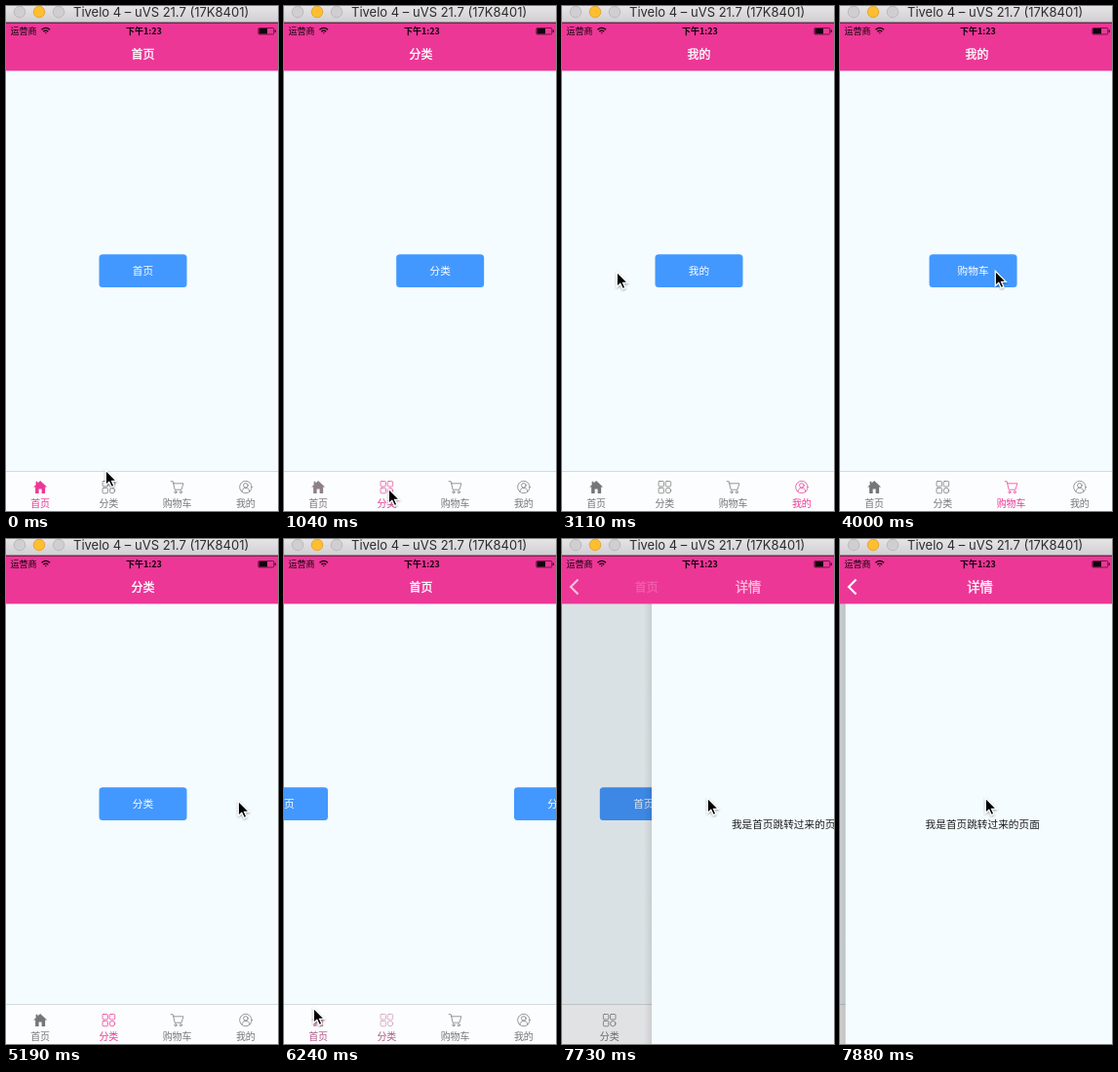
Recreate the animation shown at these times as an HTML page. Size 279 by 517 pixels, loop 8 s.

```html
<!DOCTYPE html>
<html lang="zh-CN">
<head>
<meta charset="utf-8">
<title>Tab demo</title>
<style>
  html, body { margin: 0; width: 100%; height: 100%; overflow: hidden; background: #f4fcff; }
  svg { display: block; width: 279px; height: 517px; }
  text { font-family: "Noto Sans CJK SC", "Noto Sans CJK", sans-serif; text-anchor: middle; }
  .window { font: 13px Inter, sans-serif; text-anchor: start; fill: #2c2c2c; }
  .status { font-size: 9px; fill: #14030c; }
  .nav { font-size: 12px; fill: #fff; stroke: #fff; stroke-width: .35; }
  #detailTitle { font-size: 13.3px; }
  .body { font-size: 10.67px; }
  .tab text { font-size: 10px; fill: currentColor; }
  .line { fill: none; stroke: currentColor; stroke-width: .75; stroke-linecap: round; stroke-linejoin: round; }
</style>
</head>
<body>
<svg viewBox="0 0 279 517">
  <defs>
    <linearGradient id="chrome" x2="0" y2="1">
      <stop stop-color="#e6e4e6"/><stop offset="1" stop-color="#d0ced0"/>
    </linearGradient>
    <linearGradient id="edge">
      <stop stop-color="#000" stop-opacity="0"/><stop offset="1" stop-color="#000" stop-opacity=".09"/>
    </linearGradient>
    <filter id="soft" x="-50%" y="-50%" width="200%" height="200%">
      <feDropShadow dx="0" dy="1" stdDeviation=".9" flood-opacity=".4"/>
    </filter>
  </defs>

  <rect width="279" height="517" fill="#f4fcff"/>
  <g id="under">
    <rect width="281" height="517" fill="#f4fcff"/>
    <g id="pages"></g>
    <rect y="476" width="281" height="41" fill="#fcfdfe"/>
    <rect y="476" width="281" height="1" fill="#d5dadc"/>
    <g id="tabs"></g>
  </g>
  <rect id="dim" y="66" width="279" height="451"/>
  <g id="detail">
    <rect x="-8" y="66" width="8" height="451" fill="url(#edge)"/>
    <rect y="66" width="281" height="451" fill="#f4fcff"/>
    <text class="body" x="140.500" y="296" fill="#1c1c1c">我是首页跳转过来的页面</text>
  </g>

  <rect y="17" width="279" height="49.400" fill="#ec3796"/>
  <text class="nav" id="title" y="53.800"></text>
  <text class="nav" id="detailTitle" y="54.200">详情</text>
  <path id="back" d="M16.500 41.500 9 49l7.500 7.500" fill="none" stroke="#fff" stroke-width="2.200"/>

  <text class="status" x="18" y="29">运营商</text>
  <g fill="none" stroke="#14030c" stroke-width="1.300">
    <path d="M36.500 24.300q4.300-3.800 8.600 0M38.300 26.200q2.500-2.200 5 0"/>
    <path d="M39.600 27.300h2.400l-1.200 1.300z" fill="#14030c" stroke="none"/>
  </g>
  <text class="status" x="141.500" y="29" font-weight="700">下午1:23</text>
  <rect x="258.800" y="22.500" width="16" height="6.500" rx="1" fill="none" stroke="#4d1030" stroke-width=".8"/>
  <rect x="259.500" y="23" width="8.500" height="5.500" fill="#14030c"/>
  <rect x="275.500" y="24.500" width="1.500" height="2.500" fill="#4d1030"/>

  <rect width="279" height="17" fill="url(#chrome)"/>
  <rect y="16.600" width="279" height="1" fill="#3a1228"/>
  <g stroke-width=".8">
    <circle cx="14" cy="6" r="5.800" fill="#d0ced0" stroke="#b5b3b5"/>
    <circle cx="34" cy="6" r="5.800" fill="#fdbe30" stroke="#dd9f2b"/>
    <circle cx="54" cy="6" r="5.800" fill="#d0ced0" stroke="#b5b3b5"/>
  </g>
  <text class="window" x="69" y="11">Tivelo 4 – uVS 21.7 (17K8401)</text>

  <g id="cursor" filter="url(#soft)">
    <path transform="translate(-.7 -.7)" d="M0 0V15.200L3.500 12 6 17.300 8.600 16.100 6.200 11H11Z" stroke="#fff" stroke-width="1.200"/>
  </g>
</svg>
<script>
const LOOP = 8000, TICK = 148.4, LEAD = 14;
const W = 281; // page width, slightly wider than the visible stage
const $ = id => document.getElementById(id);
const names = ['首页', '分类', '购物车', '我的'];
const icons = [
  `<path fill="currentColor" d="M0-6.500 7 0H5V6.500H1.500V2H-1.500V6.500H-5V0H-7L-4.500-2.300V-5.800H-2.700V-4Z"/>`,
  `<g class="line"><rect x="-6.300" y="-6" width="5.400" height="5.400" rx="1"/>
   <rect x=".9" y="-6" width="5.400" height="5.400" rx="1"/>
   <rect x="-6.300" y=".9" width="5.400" height="5.400" rx="1"/><circle cx="3.600" cy="3.600" r="2.700"/></g>`,
  `<g class="line"><path d="M-6.500-5.800H-4.400L-2.500 2.700H4.300L6.300-3.700H-3.800"/>
   <circle cx="-1.700" cy="5.200" r="1.100"/><circle cx="3.700" cy="5.200" r="1.100"/></g>`,
  `<g class="line"><circle r="6.200"/><circle cy="-1.700" r="2.300"/><path d="M-4 4.600Q-3.500 .9 0 .9T4 4.600"/></g>`
];

$('pages').innerHTML = names.map((name, i) => `<g transform="translate(${i * W})">
  <g class="button"><rect x="95.500" y="254.300" width="90" height="33.750" rx="3.500" fill="#4398ff"/>
  <text class="body" x="140.500" y="275.400" fill="#fff">${name}</text></g></g>`).join('');
$('tabs').innerHTML = names.map((name, i) => `<g class="tab" transform="translate(${(i + .5) * W / 4} 492.500)">
  <g class="icon">${icons[i]}</g><text y="20.900">${name}</text></g>`).join('');
const tabs = [...document.querySelectorAll('.tab')];
const homeButton = document.querySelector('.button');

// Progress per tick of a page change
const tap = [.5, .93, 1], swipe = [.22, .713, .986, 1];
// [first tick, from, to, profile, tick of the title change]
const slides = [
  [6, 0, 1, tap, 6],
  [13, 1, 2, tap, 13],
  [18, 2, 3, swipe, 21],
  [25, 3, 2, swipe, 28],
  [32, 2, 1, swipe, 35],
  [42, 1, 0, tap, 42]
];
// [tick, x, y]
const path = [
  [0, 103, 476], [1, 106, 486], [2, 108, 493], [3, 108, 495], [8, 108, 495],
  [13, 190, 500], [14, 193, 496], [16, 222, 285], [17, 222, 280], [18, 155, 276],
  [19, 60, 273], [20, 57, 273], [24, 57, 273], [25, 118, 274], [26, 160, 272],
  [28, 160, 272], [29, 118, 271], [31, 118, 271], [32, 180, 270], [33, 239, 269],
  [35, 239, 269], [38, 42, 468], [39, 34, 478], [40, 31, 481], [45, 31, 481],
  [48, 150, 253], [49, 150, 266], [54, 150, 266]
];

function pageAt(n) {
  let page = 0, title = 0;
  for (const [start, from, to, steps, retitle] of slides) {
    if (n >= start) page = from + (to - from) * steps[Math.min(n - start, steps.length - 1)];
    if (n >= retitle) title = to;
  }
  return { page, title };
}

function cursorAt(n) {
  const i = Math.max(1, path.findIndex(p => p[0] >= n));
  const [a, x, y] = path[i - 1], [b, u, v] = path[i];
  const k = (n - a) / (b - a);
  return [x + (u - x) * k, y + (v - y) * k];
}

const mix = (a, b, k) => Math.round(a + (b - a) * k);
const move = (el, x, y = 0) => el.setAttribute('transform', `translate(${x} ${y})`);

function draw(t) {
  const n = Math.floor((t + LEAD) / TICK);
  const { page, title } = pageAt(n);
  move($('pages'), -page * W);
  tabs.forEach((tab, i) => {
    const k = Math.max(0, 1 - Math.abs(page - i));
    tab.style.color = `rgb(${mix(118, 236, k)},${mix(118, 55, k)},${mix(118, 150, k)})`;
    // Both icon states are half transparent in the middle of the cross-fade
    tab.firstElementChild.style.opacity = 1 - 1.6 * k * (1 - k);
  });

  const gap = n < 52 ? W : n < 53 ? 92 : 5.7;
  const push = 1 - gap / W;
  move($('under'), -push * W * .3);
  move($('detail'), gap);
  $('detail').style.visibility = push ? 'visible' : 'hidden';
  $('dim').style.opacity = push * .16;
  homeButton.style.opacity = n === 50 || n === 51 ? .35 : 1;

  $('title').textContent = names[title];
  $('title').setAttribute('x', 140.5 - push * 80);
  $('title').style.opacity = Math.max(0, 1 - push * 1.2);
  $('detailTitle').setAttribute('x', 140.5 + gap * .55);
  $('detailTitle').style.opacity = $('back').style.opacity = push;
  move($('cursor'), ...cursorAt(n));
}

const begin = performance.now();
function loop() {
  draw((performance.now() - begin) % LOOP);
  requestAnimationFrame(loop);
}
loop();
</script>
</body>
</html>
```
